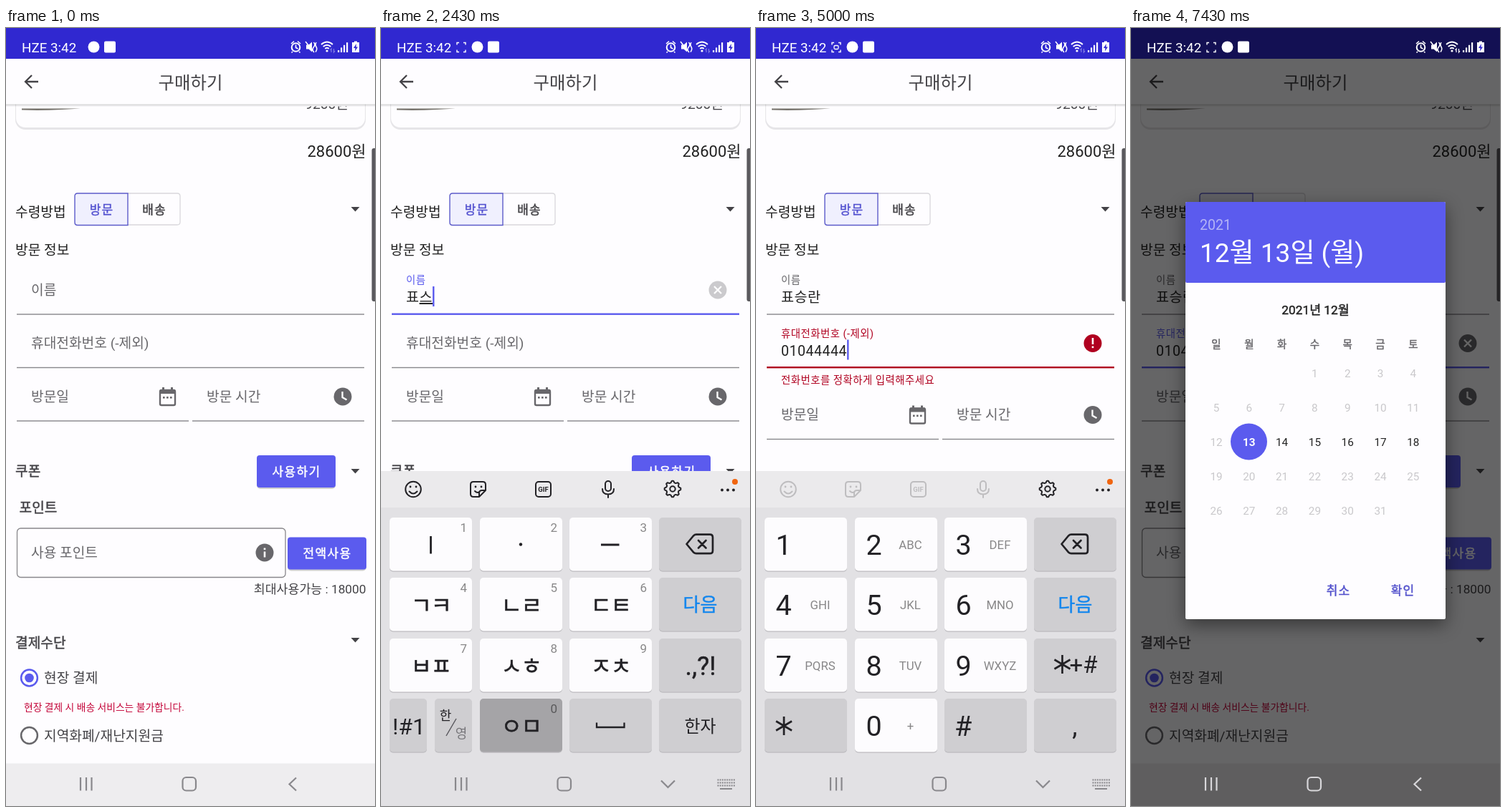
An HTML page that plays this animation: 515 by 1087 pixels, repeating every 8 s.

```html
<!DOCTYPE html>
<html lang="ko">
<head>
<meta charset="utf-8">
<style>
html, body { margin: 0; width: 100%; height: 100%; overflow: hidden; background: #fefdff; }
svg { display: block; width: 515px; height: 1087px; font-family: Roboto, 'Noto Sans CJK KR', 'Noto Sans CJK', sans-serif; }
text { white-space: pre; }
.medium { stroke: currentColor; stroke-width: .45; }
#dialog { filter: drop-shadow(0 8px 12px rgba(0, 0, 0, .45)); }
</style>
</head>
<body>
<svg id="stage" viewBox="0 0 515 1087" xmlns="http://www.w3.org/2000/svg"></svg>
<script>
const BLUE = '#5b5bee', INK = '#444347', GREY = '#68676b', RED = '#b00020', LOOP = 8000;

// ---- drawing helpers; text is placed by its vertical centre ----
const text = (x, cy, size, str, fill = INK, extra = '') =>
  `<text x="${x}" y="${cy + size * .36}" font-size="${size}" fill="${fill}" color="${fill}" ${extra}>${str}</text>`;
const MID = 'text-anchor="middle"', END = 'text-anchor="end"', MEDIUM = 'class="medium"';
const rect = (x, y, w, h, fill, r = 0, extra = '') =>
  `<rect x="${x}" y="${y}" width="${w}" height="${h}" rx="${r}" fill="${fill}" ${extra}/>`;
const circle = (x, y, r, fill, extra = '') => `<circle cx="${x}" cy="${y}" r="${r}" fill="${fill}" ${extra}/>`;
const line = (d, stroke, w = 2, extra = '') =>
  `<path d="${d}" fill="none" stroke="${stroke}" stroke-width="${w}" ${extra}/>`;
const shape = (d, fill) => `<path d="${d}" fill="${fill}"/>`;
const group = (id, ...parts) => `<g id="${id}">${parts.join('')}</g>`;
const ROUND = 'stroke-linecap="round" stroke-linejoin="round"';

const arrow = cy => shape(`M481.500 ${cy - 3}h12l-6 6.500z`, INK);
const button = (x, y, label) =>
  rect(x, y + 2, 110, 45, '#00000030', 5) + rect(x, y, 110, 45, BLUE, 4) +
  text(x + 55.500, y + 22.500, 17, label, '#fff', MID + ' letter-spacing="1.4" ' + MEDIUM);
const underline = (x, y, w) => rect(x, y - .7, w, 1.4, '#88878b');
const radio = (cy, on) =>
  circle(32.500, cy, 11.400, 'none', `stroke="${on ? BLUE : GREY}" stroke-width="2.5"`) +
  (on ? circle(32.500, cy, 6.300, BLUE) : '');
const badge = (x, y, fill, glyph) => circle(x, y, 12.500, fill) + line(glyph, '#fff', 2.3);
const cross = (x, y) => `M${x - 5} ${y - 5}l10 10m0 -10l-10 10`;

// ---- page ----
function field(id, cy, label) {
  return `<text id="${id}Label">${label}</text>` +
    `<text id="${id}Value" x="35" y="${cy + 17}" font-size="19.6" letter-spacing=".5" fill="#222"></text>` +
    rect(0, cy - 5, 2.4, 28, BLUE, 0, `id="${id}Caret"`) +
    rect(15, cy + 33.300, 485, 1.4, '#88878b', 0, `id="${id}Line"`) +
    group(id + 'Clear', badge(470, cy, GREY, cross(470, cy)));
}

function page() {
  const calendar = rect(215, 506, 21, 21, 'none', 2, `stroke="${GREY}" stroke-width="2.4"`) +
    rect(215, 505, 21, 6, GREY) + rect(218, 502, 3, 5, GREY) + rect(230, 502, 3, 5, GREY) +
    [219, 224, 229].map(x => rect(x, 515, 2.6, 2.6, GREY)).join('');
  return [
    rect(0, 0, 515, 1087, '#fefdff'),
    rect(13, 70, 489, 72, '#e6e5e8', 14), rect(14, 70, 487, 69, '#fefdff', 13),
    shape('M22 112.500h82l-26 1.500q-30 1.500-56 .5z', '#77736c'),
    text(478, 106.500, 19.2, '9200원', INK, END), rect(400, 98, 90, 11.500, '#fefdff'),
    text(502.500, 172, 22, '28600원', '#222', END),
    text(13, 257, 19.2, '수령방법', '#222'),
    shape('M170 231h69q4 0 4 4v36q0 4-4 4h-69', '#fefdff'),
    line('M170 231h69q4 0 4 4v36q0 4-4 4h-69', '#d9d8dc', 1.3),
    `<path d="M100 231h70v44.500h-70q-4 0-4-4v-36.500q0-4 4-4z" fill="#f0f0fe" stroke="#5c5bc9" stroke-width="1.4"/>`,
    text(133.500, 254, 17, '방문', '#5250cf', MID + ' letter-spacing="1.2" ' + MEDIUM),
    text(207, 254, 17, '배송', INK, MID + ' letter-spacing="1.2" ' + MEDIUM),
    arrow(253), text(13, 310, 19.2, '방문 정보', '#222'),
    field('name', 366, '이름'), field('phone', 440.500, '휴대전화번호 (-제외)'),
    group('error', circle(470, 440.500, 12.500, RED), rect(468.700, 433, 2.6, 9, '#fff'), rect(468.700, 444.500, 2.6, 2.6, '#fff'),
      text(35, 492, 14.4, '전화번호를 정확하게 입력해주세요', RED, 'letter-spacing=".5"')),
    group('below',
      text(35, 515, 19.2, '방문일', GREY), calendar, underline(15, 549, 240),
      text(280, 515, 19.2, '방문 시간', GREY), badge(470, 515, GREY, 'M469.500 508v8l6 3.500'), underline(260, 549, 240),
      text(13, 619, 19.2, '쿠폰', INK, MEDIUM), button(350, 597, '사용하기'), arrow(619),
      text(18.500, 670, 19.2, '포인트', INK, MEDIUM),
      rect(15.500, 699, 374.500, 68.500, 'none', 5, 'stroke="#88878b" stroke-width="1.3"'),
      text(35, 733, 19.2, '사용 포인트', GREY),
      circle(361, 733, 12.500, GREY), rect(359.700, 726.500, 2.6, 2.6, '#fff'), rect(359.700, 731.500, 2.6, 8, '#fff'),
      button(393, 711.500, '전액사용'),
      text(502.500, 784, 17.3, '최대사용가능 : 18000', INK, END),
      text(13, 859, 19.2, '결제수단', INK, MEDIUM), arrow(855),
      radio(908, true), text(53, 908, 19.2, '현장 결제'),
      text(25, 949, 13.8, '현장 결제 시 배송 서비스는 불가합니다.', '#c4063a'),
      radio(988.500, false), text(53, 989, 19.2, '지역화폐/재난지원금')),
    rect(510.500, 168, 8, 214, '#5a595d', 3),
    rect(0, 43, 515, 66.500, '#00000012'), rect(0, 43, 515, 65, '#00000014'), rect(0, 43, 515, 63.500, '#fefdff'),
    line('M45 75H27m9 -9l-9 9l9 9', INK, 2.3),
    text(257.500, 76, 24.4, '구매하기', INK, MID),
    rect(0, 0, 515, 43, '#3028d0'),
    rect(0, 1027.500, 515, 60, '#eeedef')
  ].join('');
}

// ---- keyboards ----
const COL = [12, 138, 263, 388], ROW = [684, 768, 853, 937];
const DARK = '#222125', HINT = '#00000076';
const keyBox = (id, x, y, w, fn) =>
  rect(x, y + 1.200, w, 74.500, '#bdbcc0', 5) + rect(x, y, w, 74.500, fn ? '#cfced1' : '#fdfcfe', 5, `id="${id}"`);
const star = (x, y) => line(`M${x} ${y - 13}v26M${x - 11} ${y - 6.5}l22 13m0 -13l-22 13`, DARK, 2.7);

const eachKey = fn => Array.from({ length: 16 }, (_, i) => fn(i, COL[i % 4], ROW[i >> 2])).join('');
const backspace = line('M426.500 721l9.500-11.500q2-1.800 4-1.800h19q4 0 4 4v18.500q0 4-4 4h-19q-2 0-4-1.800z M443 716l10.500 10.500m0 -10.500l-10.500 10.500', DARK, 2.7, ROUND);
const next = text(445.500, 806, 26, '다음', '#1286ee', MID + ' ' + MEDIUM);

function hangulPad() {
  const marks = ['', '', '', '', 'ㄱㅋ', 'ㄴㄹ', 'ㄷㅌ', '', 'ㅂㅍ', 'ㅅㅎ', 'ㅈㅊ', '', '', 'ㅇㅁ', '', ''];
  const keys = eachKey((i, x, y) => {
    const c = i % 4, white = i === 13 || (c < 3 && i < 12);
    if (i === 12) return keyBox('h12', 12, y, 52, true) + keyBox('han', 75, y, 52, true);
    const num = i === 13 ? 0 : (i >> 2) * 3 + c + 1;
    return keyBox('h' + i, x, y, 115, !white) +
      text(x + 57.500, y + 38, 32, marks[i], DARK, MID + ' letter-spacing="-1.5" ' + MEDIUM) +
      (white ? text(x + 108, y + 13.500, 17, num, HINT, END) : '');
  });
  return keys + line('M69.500 710v24.500M307 722h25.500', DARK, 2.8) + circle(195, 721.500, 2.2, DARK) +
    backspace + next + text(446, 891, 36, '.,?!', DARK, MID + ' ' + MEDIUM) +
    text(39, 975, 32, '!#1', DARK, MID) + text(90, 961, 18, '한', DARK, MID) +
    text(112, 986, 18, '영', '#77767a', MID) + line('M91 989l14-24', '#55545a', 1.4) +
    line('M301 970.500v6.500h38.500v-6.500', DARK, 2.3) + text(445.500, 975, 24, '한자', DARK, MID);
}

function numberPad() {
  const sub = ['', 'ABC', 'DEF', 'GHI', 'JKL', 'MNO', 'PQRS', 'TUV', 'WXYZ'];
  return eachKey((i, x, y) => {
    const c = i % 4, r = i >> 2, n = r * 3 + c, white = i === 13 || (c < 3 && r < 3);
    let label = '';
    if (white) {
      label = text(x + 15.500, y + 38, 39.5, i === 13 ? 0 : n + 1, DARK) +
        text(x + 77.500, y + 37.500, 16.8, i === 13 ? '+' : sub[n], HINT, MID);
    }
    return keyBox('n' + i, x, y, 115, !white) + label;
  }) + backspace + next + star(427.500, 889) + text(457, 889, 33, '+#', DARK, MID) +
    star(39, 975) + text(277, 975, 39.5, '#', DARK) + text(445, 975, 37, ',', DARK, MID);
}

function toolbar() {
  const s = w => `fill="none" stroke="${DARK}" stroke-width="${w}" ${ROUND}`;
  const gear = Array.from({ length: 32 }, (_, i) => {
    const a = (i - .5) * Math.PI / 16, r = i % 4 < 2 ? 11.4 : 9;
    return `${(407 + r * Math.cos(a)).toFixed(1)} ${(644 + r * Math.sin(a)).toFixed(1)}`;
  }).join('L');
  return rect(0, 619, 515, 51, '#ebeaec') +
    group('tools',
      `<g ${s(2)}><circle cx="45" cy="644.500" r="10.800"/><path d="M39.500 647.500q5.500 6 11 0"/>
      <path d="M129 634h13q4 0 4 4v8l-9 9h-8q-4 0-4-4v-13q0-4 4-4zM146 646h-5q-4 0-4 4v5M131 647q4 4 7 0"/>
      <rect x="216" y="634" width="21" height="21" rx="4"/>
      <rect x="313" y="633" width="8" height="14" rx="4"/><path d="M309 644q0 7.500 8 7.500t8-7.500M317 652v4"/></g>`,
      [41, 49, 132, 140].map(x => circle(x, 641, 1.4, DARK)).join(''),
      text(226.500, 644.500, 9.5, 'GIF', DARK, MID + ' font-weight="700"')) +
    `<path d="M${gear}Z" ${s(2)}/><circle cx="407" cy="644" r="3.700" ${s(2)}/>` +
    [476, 484, 492].map(x => circle(x, 645.500, 2, DARK)).join('') + circle(494, 634, 4, '#f06510');
}

// ---- dialog ----
function dialog() {
  const X = i => 119 + i * 45.8;
  let out = rect(76, 243, 363, 583, '#fefdff', 2) + rect(76, 243, 363, 113, BLUE, 2) +
    text(96, 275, 19.6, '2021', '#b4b4f6') + text(96, 314, 37, '12월 13일 (월)', '#fff') +
    text(257.500, 394, 17.3, '2021년 12월', '#222', MID + ' ' + MEDIUM) +
    circle(164.500, 578, 25.500, BLUE);
  [...'일월화수목금토'].forEach((d, i) => out += text(X(i), 442, 14.5, d, '#68676b', MID + ' ' + MEDIUM));
  for (let d = 1; d <= 31; d++) {
    const k = d + 2, today = d === 13;
    out += text(X(k % 7), 482 + 48.1 * Math.floor(k / 7), 15.3, d,
      today ? '#fff' : d > 13 && d < 19 ? '#222' : '#c9c8cb', MID + (today ? ' font-weight="700"' : ''));
  }
  return out + text(289.500, 786, 17, '취소', '#5352cc', MID + ' letter-spacing="1.2" ' + MEDIUM) +
    text(379.500, 786, 17, '확인', '#5352cc', MID + ' letter-spacing="1.2" ' + MEDIUM);
}

// ---- system bars ----
function statusIcons() {
  const W = '#fff';
  const bars = [0, 1, 2, 3].map(i => rect(463 + i * 4, 31 - i * 3.6, 2.2, 3 + i * 3.6, W)).join('');
  return text(22, 27, 18.8, 'HZE 3:42', W) +
    group('capture', line('M109 20.500h-3v3m0 7v3h3m6 0h3v-3m0 -7v-3h-3', W, 1.4),
      group('lens', rect(109, 24.500, 6, 5, 'none', 1.5, 'stroke="#fff" stroke-width="1.3"'))) +
    group('apps', circle(122.500, 26.500, 8, W), rect(137, 18.500, 16, 16, W, 2)) +
    circle(404.500, 27, 5.800, 'none', 'stroke="#fff" stroke-width="2"') +
    line('M404.500 23.500v4l3 1.500M398 22l4-3.500m5 0l4 3.500M400 33l-1.500 1.500m10.500 -1.500l1.500 1.500', W, 1.6) +
    shape('M419 23.500h3.500l4.500-4v14l-4.500-4h-3.500z', W) + line('M418 19l12 15M429.500 20q3 3 0 6.500t0 7M433 20q-2 3.500 0 6.500t-1 7', W, 1.5) +
    line('M440 23q8-7 16 0M442.700 26q5.300-4.600 10.600 0M445.300 29q2.700-2.400 5.400 0', W, 1.9) + circle(448, 32, 1.6, W) +
    line('M454 34v-5l-1.500 2M457.500 29v5l1.500-2', W, 1.2, 'id="traffic"') + bars +
    shape('M486 18.500h4v1.500h3v14h-10v-14h3z', W) + shape('M489 22l-4 6h2.500l-.5 4.500l4-6h-2.500z', '#3028d0');
}

function navIcons() {
  const dots = Array.from({ length: 24 }, (_, i) =>
    `<rect x="${469.5 + i % 8 * 3.2}" y="${1049.500 + (i >> 3) * 4}" width="2" height="2"/>`).join('');
  return `<g id="nav" fill="none" stroke-width="2.2"><path d="M104 1047v18.500M112 1047v18.500M119.500 1047v18.500"/>
    <rect x="246.500" y="1047" width="18.500" height="18.500" rx="5"/>
    <path id="back" d="M405 1047.500l-9.500 9l9.500 9"/><path id="down" d="M391 1051.500l9.500 9.500l9.500-9.500"/></g>
    <g id="switcher" fill="#89888c">${dots}<rect x="473" y="1062" width="17" height="2"/></g>`;
}

const stage = document.getElementById('stage');
stage.innerHTML = page() +
  group('keyboard', rect(0, 619, 515, 468, '#e2e1e4'), toolbar(), group('hangul', hangulPad()), group('numbers', numberPad())) +
  rect(0, 0, 515, 1087, '#000', 0, 'id="dim"') + group('dialog', dialog()) + statusIcons() + navIcons();

// ---- motion ----
const $ = {};
stage.querySelectorAll('[id]').forEach(el => $[el.id] = el);
const show = (id, v) => $[id].setAttribute('opacity', +v);
const clamp = v => Math.max(0, Math.min(1, v));
const ramp = (t, a, b) => { const p = clamp((t - a) / (b - a)); return 1 - (1 - p) ** 2; };
const within = (t, a, b) => t >= a && t < b;

// time, finished text, syllable being composed, pressed key
const TYPING = [
  [0, '', '', -1], [1710, '', 'ㅂ', 8], [1800, '', 'ㅍ', 8], [1900, '', 'ㅍ·', 1], [2000, '', 'ㅍ‥', 1],
  [2130, '', '표', 2], [2240, '표', 'ㅅ', 9], [2340, '표', '스', 2], [2420, '표', '스', 13], [2520, '표', '승', -1],
  [2860, '표승', 'ㄴ', 5], [2990, '표승', 'ㄹ', 5], [3130, '표승', '리', 0], [3230, '표승', '라', 1],
  [3320, '표승', '란', 5], [3410, '표승', '란', -1], [3530, '표승', '란', 7], [3640, '표승란', '', -1]
];
const NUMBER = '01044444444', FIRST = 4480, GAP = 125, DONE = FIRST + 7 * GAP, FOCUS2 = 3640;

function floatLabel(id, cy, p, color) {
  const size = 19.2 - 4.8 * p, el = $[id + 'Label'];
  el.setAttribute('x', 35);
  el.setAttribute('y', cy - 14 * p + size * .36);
  el.setAttribute('font-size', size);
  el.setAttribute('letter-spacing', .5 * p);
  el.setAttribute('fill', color);
}
function setLine(id, cy, color, thick) {
  $[id + 'Line'].setAttribute('fill', color || '#88878b');
  $[id + 'Line'].setAttribute('height', thick ? 2.4 : 1.4);
  $[id + 'Line'].setAttribute('y', cy + (thick ? 32.5 : 33.3));
}
function setValue(id, done, live = '') {
  const el = $[id + 'Value'], html = done + (live && `<tspan text-decoration="underline">${live}</tspan>`);
  if (el.dataset.html !== html) {
    el.innerHTML = html;
    el.dataset.html = html;
  }
  $[id + 'Caret'].setAttribute('x', 35 + (html ? el.getComputedTextLength() : 0));
}

let pressed = null;
function press(id) {
  if (pressed === id) return;
  if (pressed) $[pressed].style.fill = '';
  if (id) $[id].style.fill = '#a5a4a7';
  pressed = id;
}

function render(t) {
  const onName = within(t, 140, FOCUS2), onPhone = t >= FOCUS2;

  const [, done, live, key] = TYPING.filter(s => s[0] <= t).pop();
  setValue('name', done, live);
  floatLabel('name', 366, ramp(t, 150, 370), onName ? BLUE : GREY);
  setLine('name', 366, onName && BLUE, onName);
  show('nameCaret', onName && (within(t, 260, 710) || within(t, 1000, 1430) || t >= 1710));
  show('nameClear', onName ? ramp(t, 2400, 2570) : 0);

  const count = t < 4000 ? 0 : t < 4130 ? 1 : t < 4270 ? 2 : 3 + Math.max(0, Math.min(8, Math.floor((t - FIRST) / GAP) + 1));
  const bad = within(t, 4000, DONE), tint = bad ? RED : BLUE;
  setValue('phone', NUMBER.slice(0, count));
  floatLabel('phone', 440.5, ramp(t, FOCUS2, 3800), onPhone ? tint : GREY);
  setLine('phone', 440.5, onPhone && tint, onPhone);
  show('phoneCaret', within(t, FOCUS2, 5710));
  show('phoneClear', ramp(t, DONE, DONE + 120));
  show('error', bad);
  $.below.setAttribute('transform', `translate(0 ${bad ? 25.5 : 0})`);

  const tap = t - FIRST + 80;
  const digitDown = tap >= 0 && tap < 8 * GAP && tap % GAP < 80;
  press(key >= 0 ? 'h' + key : digitDown ? 'n4' : null);

  const up = ramp(t, 170, 420) * (1 - ramp(t, 6050, 6290));
  $.keyboard.setAttribute('transform', `translate(0 ${468 * (1 - up)})`);
  show('hangul', !onPhone);
  show('numbers', onPhone);
  show('tools', onPhone ? .22 : 1);
  const open = within(t, 290, 6200);
  show('back', !open);
  show('down', open);
  show('switcher', open);

  const dark = ramp(t, 6180, 6480);
  show('dim', .6 * dark);
  show('dialog', ramp(t, 6240, 6500));
  $.nav.setAttribute('stroke', dark > .5 ? '#d8d7da' : '#89888c');

  const noted = t >= 140;
  show('capture', noted);
  show('lens', t % 1000 < 300);
  $.apps.setAttribute('transform', `translate(${noted ? 12 : 0} 0)`);
  show('traffic', within(t, 2860, 4570) || t >= 6290 ? 1 : .4);
}

function tick() {
  render(performance.now() % LOOP);
  requestAnimationFrame(tick);
}
tick();
</script>
</body>
</html>
```
